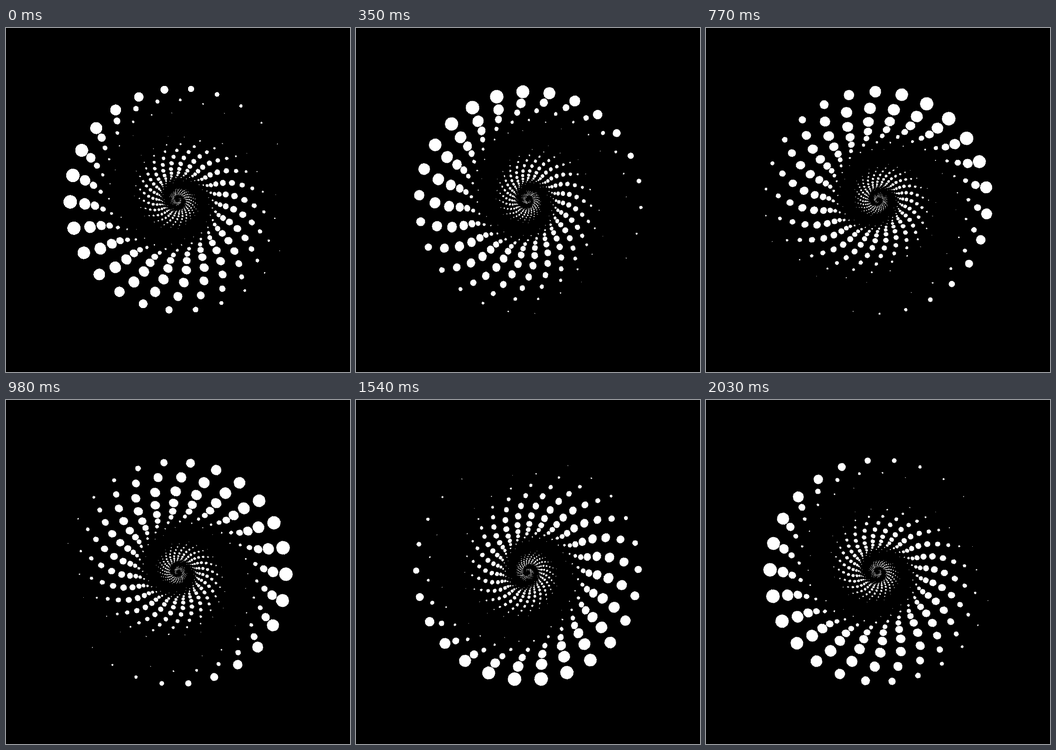
Recreate the animation shown at these times as an HTML page without scripts. Size 748x748 px, loop 2100 ms.

```html
<!DOCTYPE html>
<html lang="en">
<head>
<meta charset="utf-8">
<title>Dot spiral</title>
<style>
html, body { margin: 0; height: 100%; overflow: hidden; background: #000; }
svg { display: block; width: 100vw; height: 100vh; fill: #fff; shape-rendering: crispEdges; }

/* one ring: dots swell and shrink around an off-centre circle */
circle {
  cx: 241.4px;
  r: calc(7.35px * (1 + cos((var(--k) - .2) * 13.85deg)));
  transform: rotate(calc(178.8deg + var(--k) * 13.75deg));
}

/* each nested group squeezes and turns the ring once more */
g g { transform: rotate(-31deg) scale(.85, .9); }

#spin { animation: spin 2.1s steps(30) infinite; }
@keyframes spin { to { transform: rotate(360deg); } }
</style>
</head>
<body>
<svg viewBox="-374 -374 748 748">
<defs>
<g id="r" style="transform: translate(7px, -1px)">
<circle style="--k:-11"/><circle style="--k:-10"/><circle style="--k:-9"/><circle style="--k:-8"/>
<circle style="--k:-7"/><circle style="--k:-6"/><circle style="--k:-5"/><circle style="--k:-4"/>
<circle style="--k:-3"/><circle style="--k:-2"/><circle style="--k:-1"/><circle style="--k:0"/>
<circle style="--k:1"/><circle style="--k:2"/><circle style="--k:3"/><circle style="--k:4"/>
<circle style="--k:5"/><circle style="--k:6"/><circle style="--k:7"/><circle style="--k:8"/>
<circle style="--k:9"/><circle style="--k:10"/><circle style="--k:11"/>
</g>
</defs>
<g id="spin"><use href="#r"/>
<g><use href="#r"/><g><use href="#r"/><g><use href="#r"/><g><use href="#r"/><g><use href="#r"/>
<g><use href="#r"/><g><use href="#r"/><g><use href="#r"/><g><use href="#r"/><g><use href="#r"/>
<g><use href="#r"/><g><use href="#r"/><g><use href="#r"/><g><use href="#r"/><g><use href="#r"/>
<g><use href="#r"/><g><use href="#r"/><g><use href="#r"/><g><use href="#r"/><g><use href="#r"/>
<g><use href="#r"/><g><use href="#r"/><g><use href="#r"/><g><use href="#r"/><g><use href="#r"/>
<g><use href="#r"/><g><use href="#r"/><g><use href="#r"/><g><use href="#r"/><g><use href="#r"/>
</g></g></g></g></g></g></g></g></g></g>
</g></g></g></g></g></g></g></g></g></g>
</g></g></g></g></g></g></g></g></g></g>
</g>
</svg>
</body>
</html>
```
